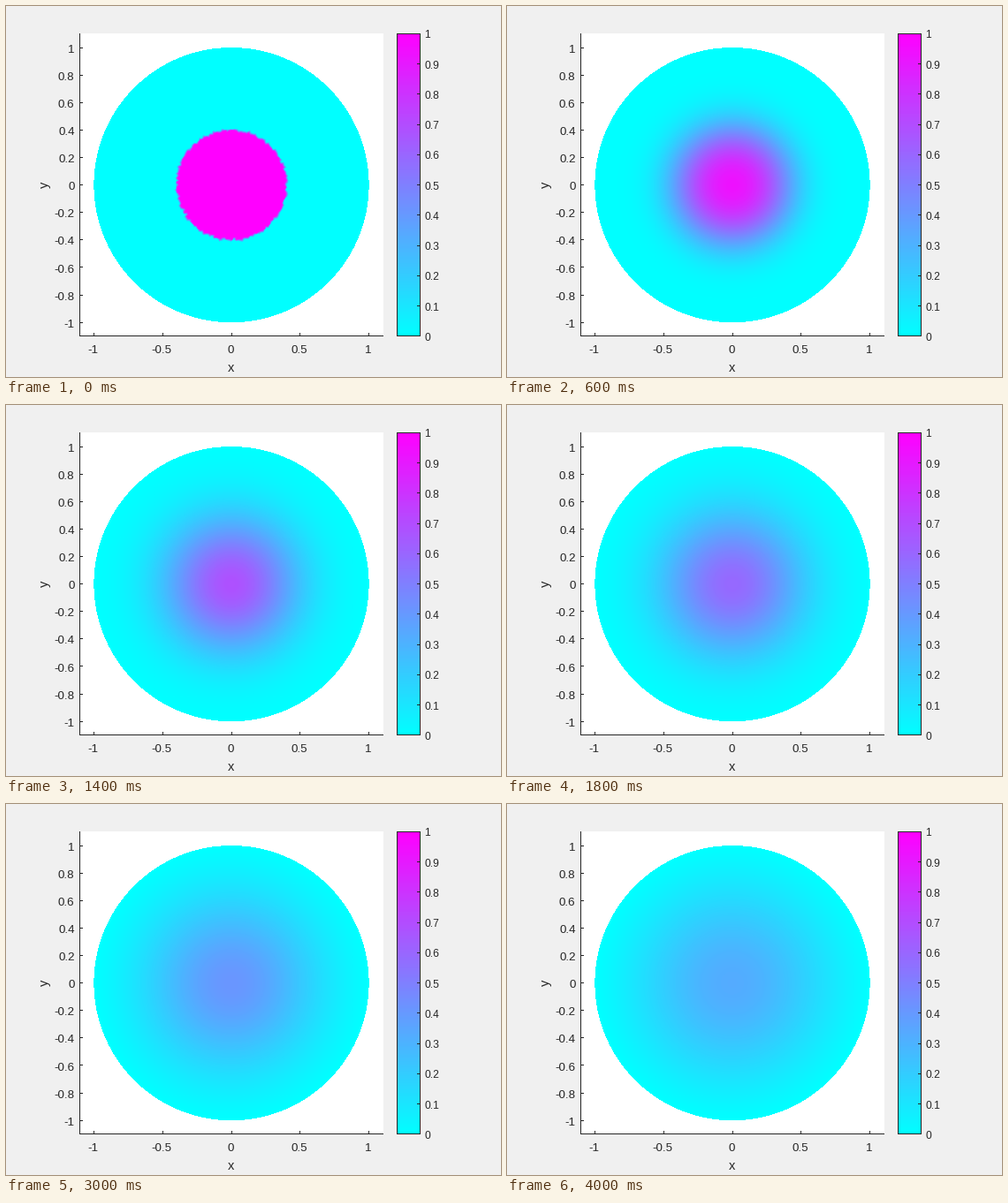
Animation of 560x420 px, one loop 4.2 s. Source, as a matplotlib script:

```python
"""Heat diffusing from a hot inner disc to the cold rim of a unit disc."""
import numpy as np
import matplotlib.pyplot as plt
from matplotlib.animation import FuncAnimation
from matplotlib.patches import Rectangle
from matplotlib.tri import LinearTriInterpolator, Triangulation

WIDTH, HEIGHT, DPI = 560, 420, 100
PX = 72 / DPI
FRAMES, INTERVAL = 21, 200
TIME_STEP = 0.005
HOT_RADIUS = 0.4
MESH_SIZE = 0.019
LEFT, RIGHT, TOP, BOTTOM = 83, 427, 31, 374
CX, CY, SCALE = 255, 202.6, 155.6
BAR_LEFT, BAR_RIGHT = 442, 469
BAR_ZERO, BAR_SPAN = 373.75, 342.3
INK = "#262626"

plt.rcParams["font.family"] = "Liberation Sans"


def bessel(order, x):
    """Integral form of the Bessel function J_n."""
    angle = (np.arange(240) + 0.5) * np.pi / 240
    x = np.asarray(x, float)[..., None]
    return np.cos(order * angle - x * np.sin(angle)).mean(axis=-1)


def bessel_zeros(count):
    zeros = (np.arange(1, count + 1) - 0.25) * np.pi
    for _ in range(6):
        zeros = zeros + bessel(0, zeros) / bessel(1, zeros)
    return zeros


ROOTS = bessel_zeros(20)
WEIGHTS = (2 * HOT_RADIUS * bessel(1, ROOTS * HOT_RADIUS)
           / (ROOTS * bessel(1, ROOTS) ** 2))
RADII = np.linspace(0, 1, 500)
MODES = bessel(0, np.outer(ROOTS, RADII))

grid_x, grid_y = np.meshgrid(
    (np.arange(LEFT, RIGHT) + 0.5 - CX) / SCALE,
    (CY - np.arange(TOP, BOTTOM) - 0.5) / SCALE)
grid_r = np.hypot(grid_x, grid_y)


def initial_field():
    """Hot disc sampled on an uneven triangle mesh, giving a ragged edge."""
    rng = np.random.default_rng(4)
    row, col = np.mgrid[-30:31, -30:31]
    x = (col + 0.5 * (row % 2)) * MESH_SIZE
    y = row * MESH_SIZE * np.sqrt(3) / 2
    x, y = (v.ravel() + rng.uniform(-0.3, 0.3, v.size) * MESH_SIZE
            for v in (x, y))
    hot = (np.hypot(x, y) <= HOT_RADIUS).astype(float)
    values = LinearTriInterpolator(Triangulation(x, y), hot)(grid_x, grid_y)
    return np.ma.filled(values, 0)


START = initial_field()


def field(step):
    """Temperature on the pixel grid, masked outside the unit disc."""
    if step == 0:
        values = START
    else:
        decay = np.exp(-ROOTS ** 2 * TIME_STEP * step)
        profile = np.clip((WEIGHTS * decay) @ MODES, 0, 1)
        values = np.interp(grid_r, RADII, profile)
    return np.ma.masked_where(grid_r > 1, values)


fig = plt.figure(figsize=(WIDTH / DPI, HEIGHT / DPI), dpi=DPI,
                 facecolor="#f0f0f0")
ax = fig.add_axes([0, 0, 1, 1])
ax.axis("off")


def box(x, y, width, height, color=INK, zorder=4):
    ax.add_patch(Rectangle((x, y), width, height, facecolor=color, lw=0,
                           antialiased=False, zorder=zorder))


def label(x, y, text, size, **style):
    ax.text(x, y, text, color=INK, fontsize=size * PX, **style)


def cool_image(values, extent):
    return ax.imshow(values, extent=extent, cmap="cool", vmin=0, vmax=1,
                     aspect="auto", interpolation="nearest", zorder=2)


box(LEFT, TOP, RIGHT - LEFT, BOTTOM - TOP, "white", 1)
heat = cool_image(field(0), (LEFT, RIGHT, BOTTOM, TOP))

box(LEFT, TOP, 1, BOTTOM - TOP)
box(LEFT, BOTTOM - 1, RIGHT - LEFT, 1)
for value in np.linspace(-1, 1, 5):
    x = CX + SCALE * value
    box(np.floor(x), BOTTOM - 4, 1, 4)
    label(x - 0.9, 393, f"{value:g}", 13.33, ha="center", va="baseline")
for k in range(-5, 6):
    y = CY - SCALE * k / 5
    box(LEFT, np.floor(y), 4, 1)
    label(77.5, y + 5.6, f"{k / 5:g}", 13.33, ha="right", va="baseline")
label(254.5, 414, "x", 14.67, ha="center", va="baseline")
label(44.2, 202, "y", 14.67, ha="center", va="center", rotation=90)

cool_image(np.linspace(1, 0, 256)[:, None],
           (BAR_LEFT, BAR_RIGHT, BOTTOM, TOP))
for x in (BAR_LEFT, BAR_RIGHT - 1):
    box(x, TOP, 1, BOTTOM - TOP)
for y in (TOP, BOTTOM - 1):
    box(BAR_LEFT, y, BAR_RIGHT - BAR_LEFT, 1)
for k in range(11):
    y = BAR_ZERO - BAR_SPAN * k / 10
    box(BAR_RIGHT - 4, np.floor(y), 4, 1)
    label(473.5, y + 5, f"{k / 10:g}", 12, ha="left", va="baseline")

ax.set_xlim(0, WIDTH)
ax.set_ylim(HEIGHT, 0)


def update(step):
    heat.set_data(field(step))
    return [heat]


animation = FuncAnimation(fig, update, frames=FRAMES, interval=INTERVAL,
                          repeat=True, repeat_delay=0)
plt.show()
```
